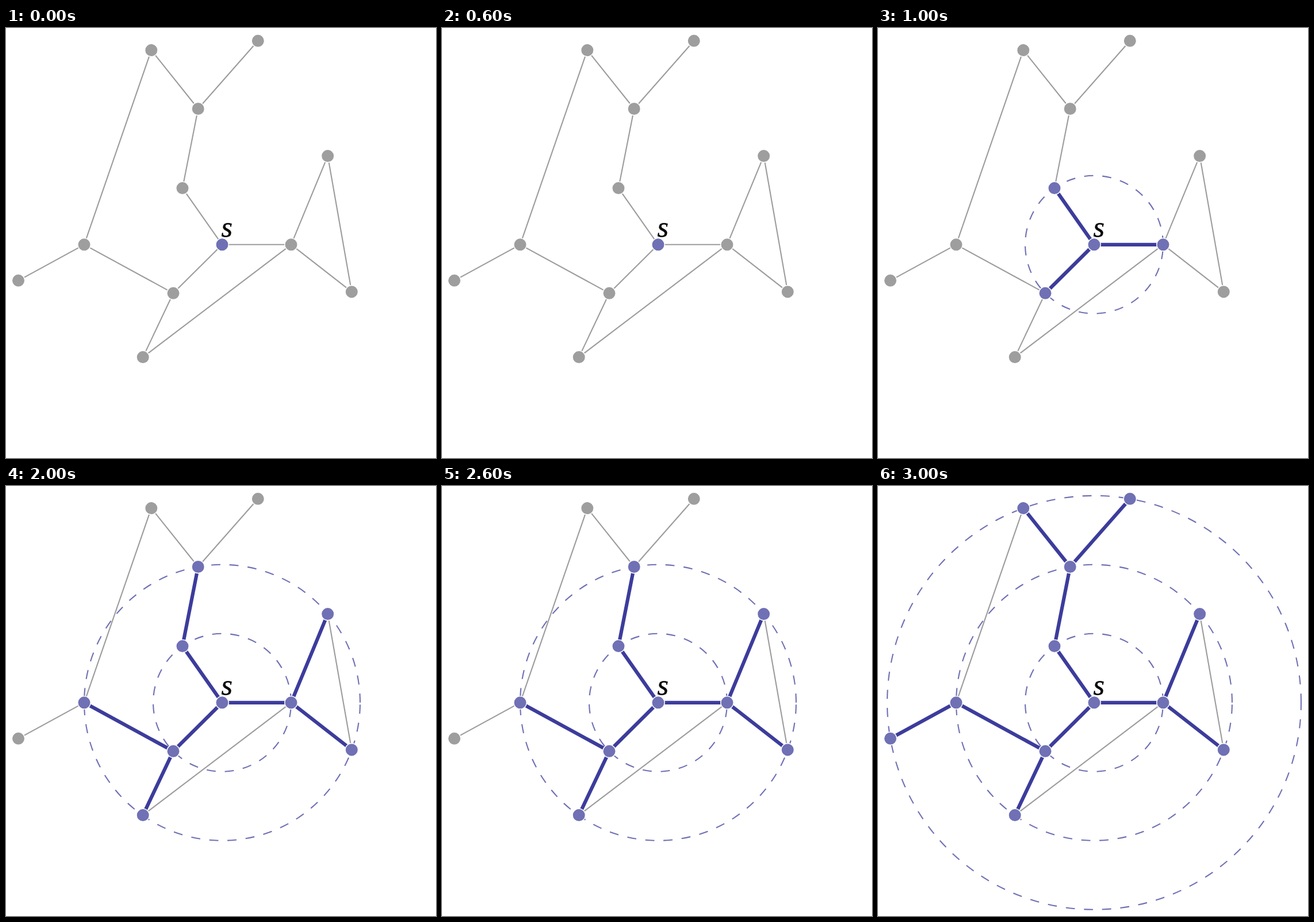
Write an HTML page that moves like this. It is 748 px wide and 748 px high and loops after 4000 ms.

```html
<!DOCTYPE html>
<html lang="en">
<head>
<meta charset="utf-8">
<title>Breadth-first search</title>
<style>
html, body { margin: 0; width: 100%; height: 100%; overflow: hidden; background: #fff; }
svg { display: block; width: 100vw; height: 100vh; }
.edge { stroke: #9c9c9c; stroke-width: 2.1; }
.edge.on { stroke: #3c3c9c; stroke-width: 6.2; }
.ring { fill: none; stroke: #7070b5; stroke-width: 2.1; stroke-dasharray: 15.83; visibility: hidden; }
.ring.on { visibility: visible; }
.node { fill: #9e9e9e; stroke: #fff; stroke-width: 1.4; }
.node.on { fill: #7070b5; }
text { font: italic 50px "Liberation Serif", "Times New Roman", serif; stroke: #000; stroke-width: .5; }
</style>
</head>
<body>
<svg viewBox="0 0 748 748"></svg>
<script>
const svg = document.querySelector('svg');
const [cx, cy, step] = [376, 376.8, 120];

// x, y, distance from s, parent in the search tree
const nodes = [
  [cx, cy, 0],
  [307, 278.6, 1, 0], [291, 461.3, 1, 0], [496, cy, 1, 0],
  [334.2, 140.5, 2, 1], [136, cy, 2, 2], [238.2, 572.6, 2, 2],
  [559.7, 222.6, 2, 3], [601.3, 458.9, 2, 3],
  [252.8, 38.6, 3, 4], [438.3, 22.3, 3, 4], [21.5, 439.3, 3, 5]
];
const extraEdges = [[5, 9], [6, 3], [7, 8]];
const parts = [];

function add(tag, attrs, level = Infinity) {
  const el = document.createElementNS('http://www.w3.org/2000/svg', tag);
  for (const key in attrs) el.setAttribute(key, attrs[key]);
  svg.append(el);
  parts.push({ el, level });
  return el;
}

function addEdge(a, b, level) {
  const [x1, y1] = nodes[a], [x2, y2] = nodes[b];
  add('line', { class: 'edge', x1, y1, x2, y2 }, level);
}

for (const [a, b] of extraEdges) addEdge(a, b);
nodes.forEach(([, , level, parent], i) => {
  if (level) addEdge(parent, i, level);
});
// rings run counterclockwise from the right so the dashes line up
for (let level = 1; level <= 3; level++) {
  const r = level * step;
  add('path', {
    class: 'ring',
    d: `M${cx + r} ${cy}A${r} ${r} 0 0 0 ${cx - r} ${cy}A${r} ${r} 0 0 0 ${cx + r} ${cy}`
  }, level);
}
for (const [x, y, level] of nodes) add('circle', { class: 'node', cx: x, cy: y, r: 11.2 }, level);
add('text', { x: 374.5, y: 363.2 }).textContent = 's';

let shown = -1;
function draw(time) {
  const now = Math.floor(time / 1000) % 4;
  if (now !== shown) {
    shown = now;
    for (const { el, level } of parts) el.classList.toggle('on', level <= now);
  }
}
function tick() {
  draw(performance.now());
  requestAnimationFrame(tick);
}
tick();
</script>
</body>
</html>
```
